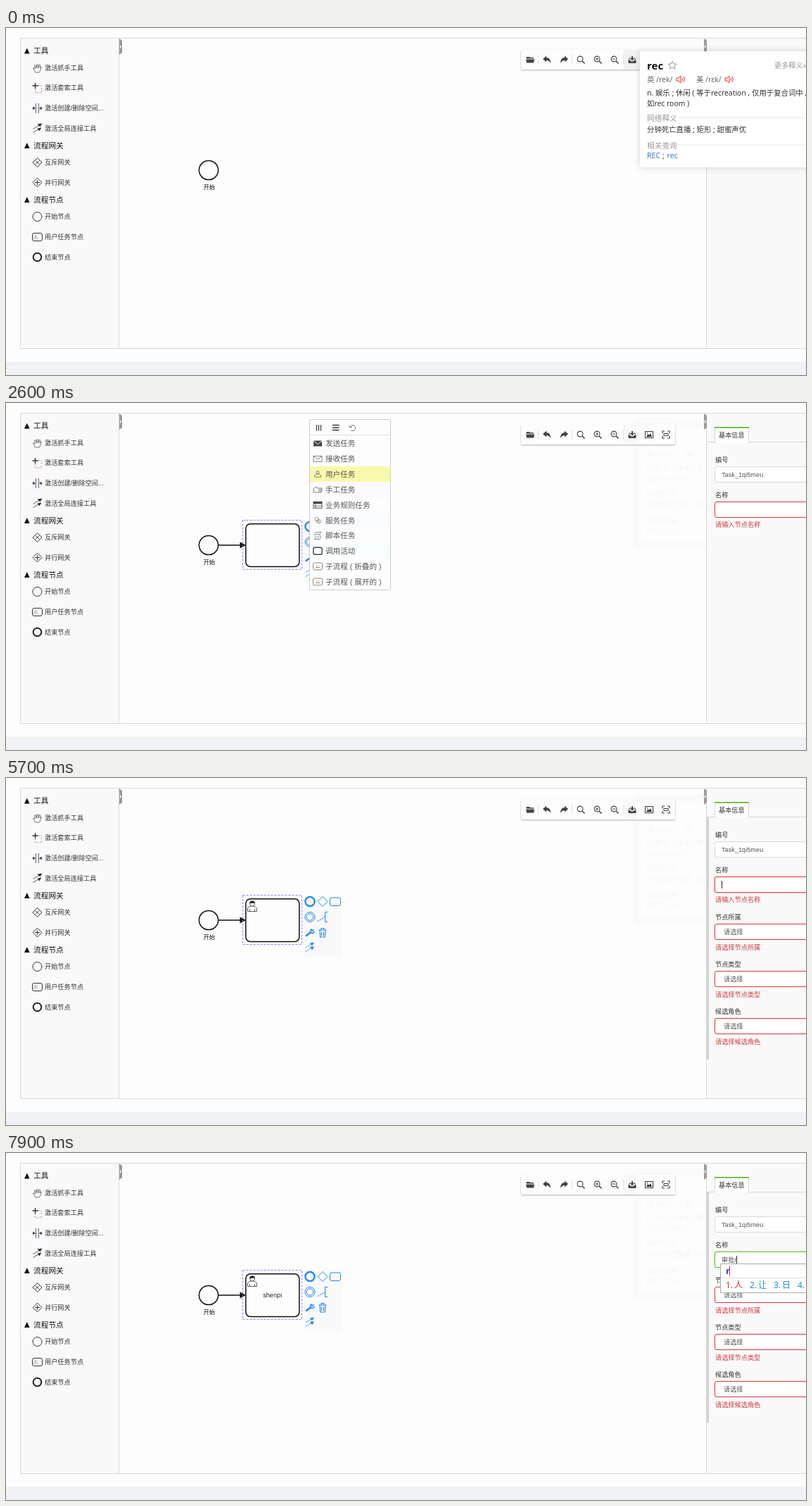
An HTML page for the animation above (8000 ms loop, 1137 px wide and 493 px high).

```html
<!DOCTYPE html>
<html lang="zh">
<head>
<meta charset="utf-8">
<title>流程设计</title>
<style>
html, body { margin: 0; width: 100%; height: 100%; overflow: hidden; background: #fdfdfd; }
svg { display: block; width: 100%; height: 100%; }
text { font-family: "Liberation Sans", "Noto Sans CJK SC", "Noto Sans CJK", sans-serif; white-space: pre; }
.ui text { font-family: "Noto Sans", "Noto Sans CJK SC", "Noto Sans CJK", sans-serif; }
</style>
</head>
<body>
<svg id="stage" viewBox="0 0 1137 493" preserveAspectRatio="none"></svg>
<script>
const LOOP = 8000, STEP = 100, END = LOOP;
const BLUE = '#1c87f5', RED = '#d3393f', INK = '#333', LINE = '#d9d9d9';

// Drawing helpers; text is placed by the middle of its line.
const text = (x, y, s, size = 9.2, fill = INK, extra = '') =>
  `<text x="${x}" y="${y + size * 0.37}" font-size="${size}" fill="${fill}" ${extra}>${s}</text>`;
const rect = (x, y, w, h, fill = 'none', stroke = 'none', r = 0, extra = '') =>
  `<rect x="${x}" y="${y}" width="${w}" height="${h}" rx="${r}" fill="${fill}" stroke="${stroke}" ${extra}/>`;
const path = (d, stroke = INK, w = 1, fill = 'none', extra = '') =>
  `<path d="${d}" stroke="${stroke}" stroke-width="${w}" fill="${fill}" ${extra}/>`;
const solid = (d, fill = INK) => path(d, 'none', 0, fill);
const ring = (x, y, r, stroke = INK, w = 1, fill = 'none') =>
  `<circle cx="${x}" cy="${y}" r="${r}" stroke="${stroke}" stroke-width="${w}" fill="${fill}"/>`;
const at = (x, y, s) => `<g transform="translate(${x} ${y})">${s}</g>`;
const layer = (spans, s) => `<g data-spans="${spans.map(p => p.join('-')).join(' ')}">${s}</g>`;

const diamond = (r, c) => path(`M0 ${-r}L${r} 0L0 ${r}L${-r} 0Z`, c, 1);
const arrows = c =>
  path('M-6 6L3 0M-6 0L3 -5', c, 1, 'none', 'stroke-dasharray="2 1"') +
  solid('M6 -1L3 4L0 -1Z M6 -7L3 -2L0 -6Z', c);
const person = c =>
  ring(0, -2.5, 2, c, .8) + path('M-4.5 4V1.5Q-3 0 -1.5 0H1.5Q3 0 4.5 1.5V4Z', c, .8);

// Palette
const hand = path('M-3 6L-6 0Q-5 -1.5 -3 1L-4 -4Q-3 -5.5 -2 -3L-1 0L-1 -5Q0 -6.5 1 -5L1 0L2.5 -4.5Q4 -5.5 4 -4L3.5 0L5 -2Q6.5 -2 5.5 0L3 6Z', '#555', .8);
const lasso = path('M-3 -3H6V7H-3Z', '#a66', .8, 'none', 'stroke-dasharray="2 2"') +
  path('M-7 -3H1M-3 -7V1', INK, 1.3);
const space = path('M-2 -7V7M2 -7V7', '#557', .9) + path('M-7 0H-3M3 0H7', INK, .9) +
  solid('M-3 0L-6 -2.5V2.5Z M3 0L6 -2.5V2.5Z');
const connect = path('M-6 6L4 0M-6 1L4 -5', '#444', .9) + solid('M6 -1L3 4L0 0Z M7 -7L4 -2L0 -6Z');
const tools = [
  [57, '激活抓手工具', hand], [85, '激活套索工具', lasso],
  [114, '激活创建/删除空间...', space], [142.5, '激活全局连接工具', connect],
  [191, '互斥网关', diamond(6.5, INK) + path('M-2.5 -2.5L2.5 2.5M2.5 -2.5L-2.5 2.5')],
  [219.5, '并行网关', diamond(6.5, INK) + path('M-3.5 0H3.5M0 -3.5V3.5')],
  [268, '开始节点', ring(0, 0, 6.5)],
  [297, '用户任务节点', rect(-7, -5.5, 14, 11, 'none', INK, 2.5) + at(-2.5, 0, `<g transform="scale(.6)">${person('#678')}</g>`)],
  [325.5, '结束节点', ring(0, 0, 5.8, '#222', 2)]
];
const heads = [[32.5, '工具'], [167, '流程网关'], [244, '流程节点']];
const grip = x => solid(`M${x} 15L${x + 4} 18V35L${x} 38Z`, '#999') + solid(`M${x + 1} 24L${x + 3} 26.5L${x + 1} 29Z`, '#fff');
const palette = heads.map(([y, s]) => solid(`M26 ${y + 4}L29.8 ${y - 4}L33.6 ${y + 4}Z`, '#111') + text(39, y, s, 10.7, '#111')).join('') +
  tools.map(([y, s, icon]) => at(44.5, y, icon) + text(55, y, s)).join('');

const base = rect(0, 0, 1137, 493, '#fdfdfd') + rect(0, 474, 1137, 19, '#f0f2f5') +
  rect(20.5, 14.5, 140, 441, '#f9f9f9', LINE) + path('M160 14.5H1137M160 455.5H1137', LINE) +
  palette + grip(161);

// Toolbar
const lens = ring(-1, -1, 3.9, '#444', 1.1) + path('M2 2L5.5 5.5', '#444', 1.6);
const back = solid('M-6 -1L-1 -5.5V-3Q5 -3 5 5Q3 1 -1 1V3.5Z', '#444');
const icons = [
  [745, solid('M-5.5 -4H-1L0 -3H5V-1.5H-5.5Z M-6 -.5H6L5 4.5H-5Z', '#444')],
  [769, back], [793, `<g transform="scale(-1 1)">${back}</g>`], [817, lens],
  [841, lens + path('M-3 -1H1M-1 -3V1', '#444')], [865, lens + path('M-3 -1H1', '#444')],
  [890, path('M-2.5 -2.5H-3.5L-5 1V4.5H5V1L3.5 -2.5H2.5', '#444') + solid('M-5 1H-2.5L-1.5 2.5H1.5L2.5 1H5V5H-5Z M-1 -5H1V-2H3L0 1.5L-3 -2H-1Z', '#444')],
  [914, rect(-5.5, -4.5, 11, 9, 'none', '#444', 0, 'stroke-width="1.1"') + solid('M-4 3L-1.5 -1L0 1L2 -2L4 3Z', '#333') + ring(-2.5, -2.3, .8, 'none', 0, '#444')],
  [938, path('M-5 -2V-5H-2M2 -5H5V-2M5 2V5H2M-2 5H-5V2', '#444', 1.2) + rect(-3, -1.5, 6, 3, 'none', '#444')]
];
const toolbar = rect(732, 30, 219, 29, '#fdfdfd', 'none', 2, 'filter="url(#soft)"') +
  rect(877.5, 31, 18, 28, '#f8f8f8') + path('M756.5 38V52M804.5 38V52M877.5 38V52', '#e2e2e2') +
  icons.map(([x, s]) => at(x, 45, s)).join('');

// Dictionary popup
const speaker = path('M-6 -2H-3L0 -5V5L-3 2H-6Z M2 -2Q3.5 0 2 2M4 -4Q7 0 4 4', '#e0302c', 1);
const section = (y, s) => text(911, y, s, 10.7, '#999') + path(`M955 ${y - 1}H1137`, '#e8e8e8');
const dict = '<g class="ui">' + rect(878, 31, 24, 28, '#f2f0f2') + at(890, 45, icons[6][1]) +
  rect(901, 33, 250, 165, '#fff', 'none', 1, 'filter="url(#glow)"') +
  text(911, 53, 'rec', 15, '#111', 'font-weight="700"') +
  at(947, 53, path('M0 -6L1.7 -2L6 -1.8L2.7 1L3.8 5.2L0 2.8L-3.8 5.2L-2.7 1L-6 -1.8L-1.7 -2Z', '#999')) +
  text(1092, 53, '更多释义»', 10.2, '#999') +
  text(911, 73.5, '英 /rek/', 10.4, '#666') + at(959, 73, speaker) +
  text(981, 73.5, '美 /rɛk/', 10.4, '#666') + at(1028, 73, speaker) +
  text(911, 92, 'n. 娱乐 ; 休闲 ( 等于recreation , 仅用于复合词中 ,', 10.4) +
  text(911, 107, '如rec room )', 10.4) + section(128.5, '网络释义') +
  text(911, 144.5, '分钟死亡直播 ; 矩形 ; 甜蜜声优', 10.4) + section(167, '相关查询') +
  text(911, 181.5, 'REC', 10.6, '#3a7bd0') + text(933, 181.5, ';', 10.6) + text(939.5, 181.5, 'rec', 10.6, '#3a7bd0') + '</g>';
const faint = (y, s) => text(911, y, s, 10.4, '#f6f6f6');
const trace = '<g clip-path="url(#canvas)">' + rect(891, 22, 130, 187, '#fafafa', 'none', 9) + rect(902, 33, 130, 165, '#fdfdfd') +
  faint(73.5, '英 /rek/　　美') + faint(92, 'n. 娱乐 ; 休闲 ( 等') + faint(107, '如rec room )') +
  faint(128.5, '网络释义') + faint(144.5, '分钟死亡直播 ; 矩形') + faint(167, '相关查询') + faint(181.5, 'REC ; rec') + '</g>';

// Diagram
const outline = (x, y, w, h, c) => rect(x, y, w, h, 'none', c, 0, 'stroke-dasharray="3 2"');
const startBox = c => outline(269.5, 183.5, 36, 36, c);
const taskBox = c => outline(336.5, 166.5, 84, 70, c);
const start = ring(288, 202, 13.6, '#111', 1.5, '#fff') + text(288.7, 225.5, '开始', 8.3, '#111', 'text-anchor="middle"');
const task = path('M302 202H334', '#111', 1.5) + solid('M341 202L332.5 197.5V206.5Z', '#111') +
  rect(340.8, 171.7, 76, 60.8, '#fdfdfd', '#111', 6.5, 'stroke-width="1.5"');
const user = at(350, 182, path('M-6.5 7.5V3Q-5 .5 -2 0H2Q5 .5 6.5 3V7.5ZM-3.5 7.5V4M3.5 7.5V4', '#333', .8, '#fff') +
  ring(0, -3.5, 3.5, '#333', .8, '#fff') + solid('M-3.8 -3.5A3.8 4 0 0 1 3.8 -3.5Q1 -5 0 -4Q-2 -4.5 -3.8 -3.5Z', '#222'));
const pad = (x, y) => at(x, y, rect(-8, -8, 54, 87, '#f9f9f9') +
  ring(0, 0, 6.6, BLUE, 2.3) + at(18, 0, diamond(7, BLUE)) + rect(28.5, -5.5, 15, 11.5, 'none', BLUE, 2.5) +
  ring(0, 22, 7, BLUE) + ring(0, 22, 4.8, BLUE) +
  at(18, 22, path('M7 -7H3.5V7H7', BLUE) + path('M-7 6L3 0', BLUE, 1.2, 'none', 'stroke-dasharray="2 1.5"')) +
  at(0, 44, path('M-6 5L1 0', BLUE, 2.4) + path('M5.5 -4.5L3 -2L2 -4.5Q-1 -2 1.5 .5Q5 2 6.5 -2', BLUE, 1.5)) +
  at(18, 44, path('M-4 -3L-3.3 6.5H3.3L4 -3M-5.5 -3.5H5.5M-2 -4V-6H2V-4M-1.5 -1V4.5M1.5 -1V4.5', BLUE, 1.1)) +
  at(0, 65, arrows(BLUE)));

// Replace menu
const G = '#666';
const mail = rect(-6, -4, 12, 8, 'none', G, 0, 'stroke-width=".8"') + path('M-6 -4L0 1L6 -4', G, .8);
const box = rect(-6.5, -5, 13, 10, 'none', '#876', 2, 'stroke-width=".9"') + path('M-3 1.5H3M-2 -1H-1M1 -1H2', '#876', 1);
const entries = [
  ['发送任务', rect(-6, -4, 12, 8, '#444') + path('M-6 -3.5L0 1L6 -3.5', '#fff', .9)],
  ['接收任务', mail], ['用户任务', person(G)],
  ['手工任务', path('M-6 4V-1L-2 -4L-1 -2H6V0H1M6 0V2H1M5 2V4H-6', G, .8)],
  ['业务规则任务', rect(-6, -4.5, 12, 9, 'none', '#555') + rect(-6, -4.5, 12, 3, '#444') + path('M-6 1.5H6M-3 -2V4', '#555', .8)],
  ['服务任务', ring(-1.5, -1.5, 2.8, '#888', .9) + ring(1.5, 1.5, 2.8, '#888', .9) + ring(1.5, 1.5, 1, '#888', .7)],
  ['脚本任务', path('M-2 -5H5Q1 -2 4 1Q5 4 2 5H-5Q-1 2 -4 -1Q-5 -4 -2 -5ZM-2 -2H2M-1 2H2', G, .8)],
  ['调用活动', rect(-6.2, -5, 12.4, 10, 'none', '#444', 2.5, 'stroke-width="1.4"')],
  ['子流程 ( 折叠的 )', box], ['子流程 ( 展开的 )', box]
];
const rowY = i => 57.5 + 21.83 * i;
const band = (i, c) => rect(432, Math.round(rowY(i) - 11), 114, 22, c);
const menuBox = rect(431.5, 23.5, 115, 242, '#fdfdfd', '#ccc', 1);
const menuText = path('M432 45.5H546', '#e0e0e0') + path('M441.5 31V39.5M444.5 31V39.5M447.5 31V39.5', INK, 1.2) +
  path('M464 31.5H473.5M464 35H473.5M464 38.5H473.5', INK, 1.5) +
  path('M490 38.5A4 4 0 1 0 489 34M487.5 32L489 35L492 34', '#666', .9) +
  entries.map(([s, icon], i) => at(443, rowY(i), icon) + text(454, rowY(i), s, 10.6, '#555')).join('');
const hover = [[2200, 7], [2300, 5], [2400, 4], [2500, 3], [2600, 2]];
const bands = hover.map(([t, i], k) => layer([[t, k < 4 ? hover[k + 1][0] : 3400]], band(i, '#f9f9ac'))).join('');
const tints = [[2300, 7, '#f9ffff'], [2400, 5, '#fafbff'], [2600, 3, '#f9f9ff']]
  .map(([t, i, c]) => layer([[t, 3400]], band(i, c))).join('');

// Properties panel
const field = (y, c) => rect(1007.5, y, 150, 22, '#fff', c, 2.5);
const nameField = (c, glow) => (glow ? rect(1007.5, 140.5, 150, 22, 'none', c, 3, 'stroke-width="4" opacity=".2"') : '') + field(140.5, c);
const panel = rect(995.5, 14.5, 160, 441, '#f9f9f9', LINE) + grip(992) +
  path('M996 55.5H1007.5V35H1055.5V55.5H1137', LINE) + rect(1008, 36, 47, 20, '#fdfdfd') + rect(1007, 34, 49, 1.5, '#4cb51c') +
  text(1013, 45.5, '基本信息') + text(1008, 81, '编号') + field(90.5, LINE) + text(1008, 131, '名称');
const selects = ['节点所属', '节点类型', '候选角色'].map((s, i) => at(0, 67 * i,
  text(1008, 198, s) + field(207.5, RED) + text(1020, 219, '请选择', 9.2, '#555') + text(1008, 240.5, '请选择' + s, 9.2, RED))).join('');
const value = (y, s, extra) => text(1017, y, s, 9.2, '#555', extra);
const caret = (x, y, h = 11, c = '#222') => rect(x, y, 1, h, c);

// Input method window: typed letters above, numbered choices below
const ime = (x, typed, words, caretX) => {
  let cx = x + 8;
  const list = [...words].map((w, i) => {
    const c = i ? '#1a88e8' : '#e3201b';
    const s = text(cx, 188, `${i + 1}.`, 12, c) + text(cx + 12, 188, w, 12, c);
    cx += 22 + 12 * w.length;
    return s;
  }).join('');
  return '<g class="ui">' + rect(x + .5, 157.5, 1140 - x, 41, '#fff', '#aaa') + path(`M${x + 1} 177.5H1137`, '#ddd') +
    text(x + 8, 167.5, typed, 12.6, '#0d57c8', 'font-weight="700"') + rect(caretX, 160.5, 1, 14, '#e3201b') + list + '</g>';
};
const typing = [
  [6400, 's', ['是', '说', '上', '时'], 1002, 1017], [6500, 'sh', ['是', '说', '上', '时'], 1002, 1025],
  [6600, 'she', ['设', '社', '射', '谁'], 1002, 1032], [6700, 'shen', ['神', '深', '申', '肾'], 1002, 1039.5],
  [6900, "shen'p", ['审批', '神', '深', '申'], 954, 1004], [7100, "shen'pi", ['审批', '身披', '神', '深'], 954, 1007.5],
  [7400]
];
const inputWidth = [5, 10, 15, 20, 27, 29];
const steps = typing.slice(0, -1).map(([t, s, words, x, cx], i) => layer([[t, typing[i + 1][0]]],
  value(151.5, s, 'text-decoration="underline"') + caret(1017 + inputWidth[i], 146) + ime(x, s, words, cx))).join('');

const withTask = [[1300, 3800], [4700, END]];
stage.innerHTML = `<defs>
<filter id="soft" x="-5%" y="-30%" width="110%" height="160%"><feDropShadow dx="0" dy="1" stdDeviation="1.2" flood-opacity=".3"/></filter>
<filter id="glow" x="-10%" y="-10%" width="120%" height="120%"><feDropShadow dx="0" dy="0" stdDeviation="4" flood-opacity=".17"/></filter>
<clipPath id="canvas"><rect x="161" y="15" width="834" height="440"/></clipPath></defs>` +
  base + layer([[100, END]], trace) + toolbar + start +
  layer([[300, 800]], startBox('#f88')) + layer([[800, 1300]], startBox('#888')) +
  layer([[600, 1300]], pad(317, 192)) +
  layer([[1300, END]], task) + layer([[1300, 1700]], caret(379, 196, 13)) +
  layer([[1300, 3400], [5100, END]], taskBox('#88f')) + layer([[3400, 5100]], taskBox('#f88')) +
  layer([[3400, END]], user) + layer(withTask, pad(432, 175.5)) +
  layer([[7400, END]], text(378.7, 202, 'shenpi', 9.2, '#222', 'text-anchor="middle"')) +
  layer([[2100, 3400]], menuBox) + tints + bands + layer([[2100, 3400]], menuText) +
  panel + `<rect id="thumb" x="996" y="56" width="3" fill="#d2d2d2"/>` +
  layer([[600, 1300]], value(101.5, 'StartEvent_1')) + layer(withTask, value(101.5, 'Task_1qi5meu')) +
  layer([[0, 1300], [3800, 4700]], nameField(LINE)) +
  layer([[1300, 3800], [4700, 5600]], nameField(RED)) +
  layer([[5600, 7400]], nameField('#dc4a4f', true)) + layer([[7400, END]], nameField('#6dbb43', true)) +
  layer([[600, 1300]], value(151.5, '开始')) +
  layer([[1300, 3800], [4700, 7700]], `<g id="error">${text(1008, 173, '请输入节点名称', 9.2, RED)}</g>`) +
  layer([[3400, 3800], [4700, END]], `<g id="selects">${selects}</g>`) +
  layer([[5600, 6100]], caret(1017, 146)) + steps +
  layer([[7400, 7900]], value(151.5, '审批') + caret(1036, 146)) +
  layer([[7900, END]], value(151.5, '审批r') + caret(1038, 146) + ime(1015, 'r', ['人', '让', '日', '如'], 1028)) +
  layer([[0, 100]], dict);

const layers = [...stage.querySelectorAll('[data-spans]')].map(el => ({
  el, spans: el.dataset.spans.split(' ').map(s => s.split('-').map(Number))
}));
const [thumb, error, fields] = ['thumb', 'error', 'selects'].map(id => document.getElementById(id));

function draw(t) {
  for (const { el, spans } of layers)
    el.style.display = spans.some(([a, b]) => t >= a && t < b) ? '' : 'none';
  // The message folds away and the fields below it rise.
  const p = Math.min(1, Math.max(0, (t - 7400) / 300));
  const rise = Math.round(17 * p * p * (3 - 2 * p));
  error.setAttribute('opacity', 1 - p);
  fields.setAttribute('transform', `translate(0 ${-rise})`);
  thumb.setAttribute('height', t < 5300 ? 0 : 344 - rise);
}
const began = performance.now();
function tick() {
  const t = (performance.now() - began) % LOOP;
  draw(Math.floor(t / STEP) * STEP);
  requestAnimationFrame(tick);
}
tick();
</script>
</body>
</html>
```
